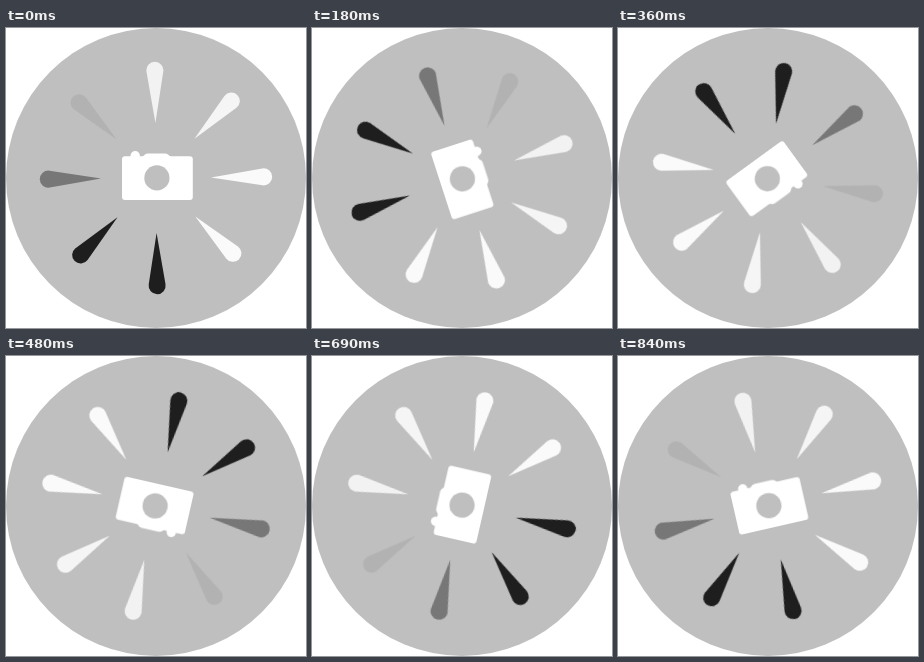
An HTML page for the animation above (870 ms loop, 300x300 px).

```html
<!DOCTYPE html>
<html lang="en">
<head>
<meta charset="utf-8">
<title>Camera spinner</title>
<style>
  html, body { margin: 0; width: 100%; height: 100%; overflow: hidden; background: #fff; }
  svg { display: block; width: 100%; height: 100%; }
  #spinner { transform-origin: 150px 150px; }
</style>
</head>
<body>
<svg viewBox="0 0 300 300">
  <circle cx="150" cy="150" r="150" fill="#bfbfbf"/>
  <g id="spinner">
    <g id="rays"></g>
    <g fill="#fff">
      <rect x="116" y="128.3" width="70.8" height="43.7" rx="3"/>
      <circle cx="129.2" cy="127.8" r="4.7"/>
      <path d="M133 130 Q137 129 139 126.5 Q140 125.5 142 125.5 H159 Q161 125.5 162 126.5 Q164 129 168 130 Z"/>
    </g>
    <circle cx="150.9" cy="149.9" r="12.6" fill="#bfbfbf"/>
  </g>
</svg>
<script>
  // Ray colours, clockwise from the top
  const colors = ['#f2f2f2', '#f5f5f5', '#fafafa', '#fafafa', '#1e1e1e', '#1e1e1e', '#777', '#b2b2b2'];
  const rays = document.getElementById('rays');

  colors.forEach((color, i) => {
    const ray = document.createElementNS('http://www.w3.org/2000/svg', 'path');
    ray.setAttribute('d', 'M150 95 L141.6 43.6 A8.5 8.5 0 1 1 158.4 43.6 Z');
    ray.setAttribute('fill', color);
    ray.setAttribute('transform', `rotate(${i * 45 - 0.6} 150 150)`);
    rays.append(ray);
  });

  // Each half turn advances in 30 ms ticks: 15 for the first, 14 for the second
  document.getElementById('spinner').animate([
    { transform: 'rotate(0deg)', offset: 0, easing: 'steps(15, end)' },
    { transform: 'rotate(180deg)', offset: 15 / 29, easing: 'steps(14, end)' },
    { transform: 'rotate(360deg)', offset: 1 }
  ], { duration: 870, iterations: Infinity });
</script>
</body>
</html>
```
